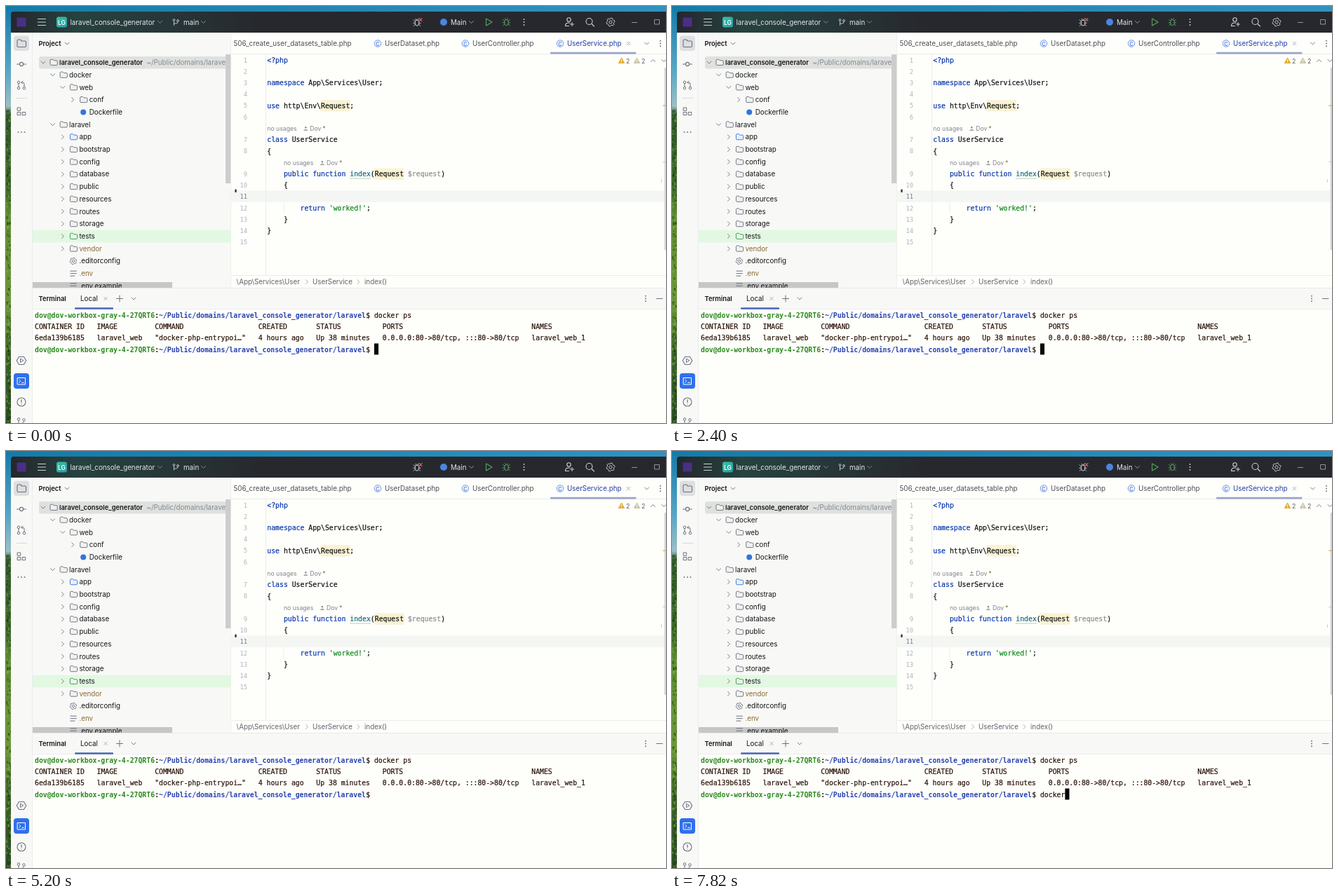
Recreate the animation shown at these times as an HTML page. Size 941 by 595 pixels, loop 8 s.

```html
<!DOCTYPE html>
<html lang="en">
<head>
<meta charset="utf-8">
<title>Editor and terminal</title>
<style>
html, body { margin: 0; width: 100%; height: 100%; overflow: hidden; background: #f8f9f6; }
svg { display: block; width: 941px; height: 595px; }
text { white-space: pre; }
.ui { font-family: Inter, "Open Sans", sans-serif; }
.mono { font-family: "DejaVu Sans Mono", "Noto Sans Mono", monospace; font-size: 9.803px; }
.firm { stroke: currentColor; stroke-width: .22px; }
</style>
</head>
<body>
<svg id="stage" viewBox="0 0 941 595" xmlns="http://www.w3.org/2000/svg"></svg>
<script>
const W = 941, H = 595, CW = 5.902;
const INK = '#141517', GRAY = '#6c707e', KEY = '#0a38ac', TERM = '#2b1509';
const PANEL = '#f8f9f6', PAPER = '#fefefb';
const out = [];
const add = s => out.push(s);
const esc = s => s.replace(/&/g, '&amp;').replace(/</g, '&lt;');

const rect = (x, y, w, h, fill, r = 0) =>
  add(`<rect x="${x}" y="${y}" width="${w}" height="${h}" rx="${r}" fill="${fill}"/>`);
const line = (d, color = GRAY, w = 1, fill = 'none') =>
  add(`<path d="${d}" fill="${fill}" stroke="${color}" stroke-width="${w}" stroke-linecap="round" stroke-linejoin="round"/>`);
const ring = (x, y, r, color = GRAY, w = 1, fill = 'none') =>
  add(`<circle cx="${x}" cy="${y}" r="${r}" fill="${fill}" stroke="${color}" stroke-width="${w}"/>`);
const dot = (x, y, r, color) => add(`<circle cx="${x}" cy="${y}" r="${r}" fill="${color}"/>`);
const ui = (x, y, s, color = INK, size = 9.8, weight = 400) =>
  add(`<text class="ui" x="${x}" y="${y + 3.5}" font-size="${size}" font-weight="${weight}" fill="${color}">${esc(s)}</text>`);
const mono = (x, y, s, color = INK, weight = 400) =>
  add(`<text class="mono${weight === 400 ? ' firm' : ''}" x="${x}" y="${y + 3.5}" font-weight="${weight}" color="${color}" fill="${color}">${esc(s)}</text>`);

const down = (x, y, color = GRAY) => line(`M${x - 3} ${y - 1.5}l3 3 3-3`, color, .9);
const right = (x, y, color = GRAY) => line(`M${x - 1.5} ${y - 3}l3 3-3 3`, color, .9);
const cross = (x, y) => line(`M${x - 2.3} ${y - 2.3}l4.6 4.6m0-4.6l-4.6 4.6`, '#9a9daa', .8);
const dots = (x, y, color, dx, dy) => {
  for (const k of [-1, 0, 1]) dot(x + k * dx, y + k * dy, .95, color);
};
const folder = (x, y, color = GRAY, fill = '#f1f2f0') =>
  line(`M${x + .5} ${y - 3}q0-1.2 1.2-1.2h2.6l1.6 1.5h3.6q1.2 0 1.2 1.2v4.2q0 1.2-1.2 1.2h-7.8q-1.2 0-1.2-1.2z`, color, .95, fill);
const gear = (x, y, r, color) => {
  ring(x, y, r * .36, color, .9);
  let d = '';
  for (let i = 0; i < 24; i++) {
    const a = (i + .5) * Math.PI / 12, q = i % 4 < 2 ? r : r * .8;
    d += (i ? 'L' : 'M') + (x + q * Math.sin(a)).toFixed(2) + ' ' + (y - q * Math.cos(a)).toFixed(2);
  }
  line(d + 'z', color, .95);
};
const bug = (x, y, color) => {
  line(`M${x - 2.7} ${y - 1}q0-2.5 2.7-2.5t2.7 2.5v2.5q0 3.2-2.7 3.2t-2.7-3.2z`, color, 1);
  line(`M${x - 5} ${y - 3.6}l2.3 2M${x + 5} ${y - 3.6}l-2.3 2M${x - 5.3} ${y + .8}h2.6m5.2 0h2.6M${x - 4.8} ${y + 4.7}l2.3-2M${x + 4.8} ${y + 4.7}l-2.3-2M${x - 1.8} ${y - 5.3}l.8 1.7m2.8-1.7l-.8 1.7`, color, .9);
};
const branch = (x, y, color) => {
  ring(x - 2.5, y - 3, 1.4, color, .9);
  ring(x + 3, y - 2, 1.4, color, .9);
  line(`M${x - 2.5} ${y - 1.6}v6M${x - 2.5} ${y + 2}h3q2.5 0 2.5-2.6`, color, .9);
};
const warning = (x, y, color) => {
  line(`M${x} ${y - 3.7}l4 7.2h-8z`, color, 1.2, color);
  line(`M${x} ${y - 1.3}v2.2m0 1.6v.1`, '#fff', .9);
};

function defs() {
  add(`<defs>
    <linearGradient id="sky"><stop stop-color="#157ba9"/><stop offset="1" stop-color="#2f93c2"/></linearGradient>
    <linearGradient id="land" x2="0" y2="1"><stop stop-color="#167dac"/><stop offset=".15" stop-color="#5ba8c5"/>
      <stop offset=".23" stop-color="#9cc0c4"/><stop offset=".25" stop-color="#2f5a2c"/><stop offset=".42" stop-color="#3d6a2a"/>
      <stop offset=".5" stop-color="#5f8d33"/><stop offset=".7" stop-color="#6b9638"/><stop offset=".82" stop-color="#3c6428"/>
      <stop offset="1" stop-color="#274922"/></linearGradient>
    <linearGradient id="bar"><stop stop-color="#25272c"/><stop offset=".1" stop-color="#26423f"/>
      <stop offset=".2" stop-color="#273a3b"/><stop offset=".38" stop-color="#27282e"/></linearGradient>
    <linearGradient id="badge" x2="1" y2="1"><stop stop-color="#38c4a4"/><stop offset="1" stop-color="#2799a8"/></linearGradient>
    <clipPath id="tree"><rect x="37" y="69" width="283.5" height="333"/></clipPath></defs>`);
}

function desktop() {
  rect(0, 0, W, 9, 'url(#sky)');
  rect(0, 6, 8, H, 'url(#land)');
  let seed = 7;
  const rnd = () => (seed = seed * 16807 % 2147483647) / 2147483647;
  for (let i = 0; i < 220; i++) {
    const shade = rnd() < .6 ? 'rgba(16,40,14,.45)' : 'rgba(150,190,80,.4)';
    rect((rnd() * 6).toFixed(1), (147 + rnd() * 446).toFixed(1), 2, (1.5 + rnd() * 3).toFixed(1), shade, 1);
  }
}

function titleBar() {
  const c = '#ced0d6';
  add('<path d="M7 38V12q0-4 4-4H941V38z" fill="url(#bar)"/>');
  rect(15.5, 16.5, 13, 13, '#4a2f86');
  line('M45.5 18.5h11m-11 4.5h11m-11 4.5h11', c, 1.1);
  rect(72, 15.5, 15, 15, 'url(#badge)', 3);
  ui(74, 23, 'LG', '#fff', 8.6, 600);
  ui(91.5, 23, 'laravel_console_generator', '#e3e5e9');
  down(219.5, 23, '#8d9099');
  branch(242, 23, c);
  ui(253, 23, 'main', '#e3e5e9');
  down(281.5, 23, '#8d9099');
  bug(586, 23.5, c);
  line('M589 17.5l4 4m0-4l-4 4', '#db5c5c', 1.1);
  dot(624, 23, 5, '#4a86e0');
  ui(634, 23, 'Main', '#e3e5e9');
  down(663.5, 23, '#a5a8b0');
  line('M684.5 18v10l8.5-5z', '#57a65c', 1.1);
  bug(713.5, 23, '#57a65c');
  dots(738.5, 23, c, 0, 4);
  ring(802.5, 19.5, 2.7, c, 1.1);
  line('M797.5 28.5q0-4.5 5-4.5h1.5m-6.5 4.5h5m4.5-5v5m-2.5-2.5h5', c, 1.1);
  ring(831.5, 22, 4.5, c, 1.1);
  line('M835 25.5l3.5 3.5', c, 1.1);
  gear(862, 23, 6, c);
  line('M892.5 23.5h7', '#9fa2a9', .9);
  line('M925 19.5h6.5v6.5h-6.5z', '#9fa2a9', .9);
}

function toolStrip() {
  rect(7, 38, 30, 557, PANEL);
  rect(11, 42.5, 22, 21.5, '#dddfe0', 4);
  line('M16 49.5q0-1.5 1.5-1.5h3l2 2h4.5q1.5 0 1.5 1.5v5.5q0 1.5-1.5 1.5h-9.5q-1.5 0-1.5-1.5z', GRAY, 1.1);
  ring(22, 83, 2.6, GRAY, 1.1);
  line('M15.5 83h3.9m5.2 0h3.9', GRAY, 1.1);
  ring(18, 108.8, 1.8);
  ring(18, 117.2, 1.8);
  ring(26, 117.2, 1.8);
  line('M18 110.6v4.8M26 115.4v-4.4q0-2-2-2h-2m1.8-2l-2 2 2 2');
  rect(15, 131, 15, 1, '#d5d7da');
  line('M16.5 145h4.2v4.2h-4.2zM16.5 151.5h4.2v4.2h-4.2zM23.5 151.5h4.2v4.2h-4.2z');
  dots(22, 180, GRAY, 4.5, 0);
  line('M18.5 500.5h7l3.3 5.5-3.3 5.5h-7l-3.3-5.5z', GRAY, 1.1);
  line('M20.5 503.5v5l4-2.5z');
  rect(11, 524, 22, 22, '#3070ea', 4);
  line('M16.5 530.5h11v9.5h-11zM18.8 533.2l2 2-2 2m4 .2h2.6', '#fff', 1);
  ring(22, 565, 6, GRAY, 1.1);
  line('M22 561.8v3.8m0 2.4v.1', GRAY, 1.2);
  ring(18, 589.5, 1.8);
  ring(25.5, 590.5, 1.8);
  line('M18 591.5v4m7.5-3q0 3-4 3');
}

// depth, name, kind, expanded, text colour, icon colour
const ROWS = [
  [1, 'docker', 'dir', 1], [2, 'web', 'dir', 1], [3, 'conf', 'dir', 0], [3, 'Dockerfile', 'box'],
  [1, 'laravel', 'dir', 1], [2, 'app', 'dir', 0, , '#3d76dc'], [2, 'bootstrap', 'dir', 0],
  [2, 'config', 'dir', 0], [2, 'database', 'dir', 0], [2, 'public', 'dir', 0], [2, 'resources', 'dir', 0],
  [2, 'routes', 'dir', 0], [2, 'storage', 'dir', 0], [2, 'tests', 'dir', 0, , '#3f9a50'],
  [2, 'vendor', 'dir', 0, '#8a6a35'], [2, '.editorconfig', 'gear'],
  [2, '.env', 'file', , '#8a6a35'], [2, '.env.example', 'file']
];

function projectTree() {
  rect(37, 38, 284, 364, PANEL);
  ui(46.5, 53.5, 'Project', INK, 9.4, 600);
  down(87, 53.5);
  add('<g clip-path="url(#tree)">');
  rect(47, 72, 280, 17.5, '#dfe1df', 3);
  rect(37, 319.7, 284, 17.7, '#e2f8e2');
  rect(37, 394, 200, 8, '#c6c7c6');
  down(53, 80.5);
  folder(62.5, 80.5);
  ui(76, 80.5, 'laravel_console_generator', INK, 9.4, 600);
  ui(200.5, 80.5, '~/Public/domains/laravel_console', '#858893');
  ROWS.forEach(([depth, name, kind, open, ink = INK, tint = GRAY], i) => {
    const y = 98.3 + i * 17.71, x = 62.3 + depth * 14.3;
    if (kind === 'dir') {
      (open ? down : right)(x - 10, y);
      folder(x, y, tint, tint === GRAY ? '#f1f2f0' : tint === '#3d76dc' ? '#e9f0fd' : '#eaf7ec');
    } else if (kind === 'box') dot(x + 5, y, 4, '#3574d8');
    else if (kind === 'gear') gear(x + 5, y, 4.8, GRAY);
    else line(`M${x + 1} ${y - 3.5}h8.5m-8.5 3.5h8.5m-8.5 3.5h6`);
    ui(x + 13.5, y, name, ink);
  });
  add('</g>');
  rect(313, 69, 7.5, 184, '#cccdcc');
  rect(320.5, 38, 1, 364, '#e8eaea');
}

function tabs() {
  rect(321, 38, 620, 31, PAPER);
  ui(324.5, 53.5, '506_create_user_datasets_table.php', '#4b4e57');
  [[530, 'UserDataset.php'], [655, 'UserController.php'], [790, 'UserService.php']].forEach(([x, name], i) => {
    ring(x, 53.5, 4.8, '#6c93dd', .95, '#edf3ff');
    ui(x - 2.7, 53.4, 'C', '#3d70d4', 7.2, 500);
    ui(x + 10, 53.5, name, i === 2 ? '#243fa6' : '#4b4e57');
  });
  cross(887.5, 53.5);
  down(913.5, 53.5);
  dots(933, 53.5, GRAY, 0, 3.7);
  rect(321, 68, 620, 1, '#ebecee');
  rect(776, 65.8, 122.5, 2.8, '#99a5cb', 1);
}

const rowY = i => 77.2 + i * 16.24;
const codeX = n => 372.3 + n * CW;

function hint(x, y) {
  ui(x, y, 'no usages', '#80838e', 8.7);
  dot(x + 55, y - 1.8, 1.2, '#80838e');
  line(`M${x + 52.7} ${y + 2.3}q2.3-3.2 4.6 0z`, '#80838e', .8);
  ui(x + 61, y, 'Dov', '#80838e', 8.7);
  ui(x + 79, y, '*', '#8a6a35', 8.7);
}

// row, column, text, colour
const CODE = [
  [0, 0, '<?php', KEY], [2, 0, 'namespace', KEY], [2, 10, 'App\\Services\\User;'],
  [4, 0, 'use', KEY], [4, 4, 'http\\Env\\Request;'], [7, 0, 'class', KEY], [7, 6, 'UserService'],
  [8, 0, '{'], [10, 4, 'public function', KEY], [10, 20, 'index', '#1d6b80'], [10, 25, '(Request'],
  [10, 34, '$request', '#8c8c8c'], [10, 42, ')'], [11, 4, '{'], [13, 8, 'return', KEY],
  [13, 15, "'worked!'", '#118a20'], [13, 24, ';'], [14, 4, '}'], [15, 0, '}']
];

function editor() {
  rect(321, 69, 620, 315, PAPER);
  rect(321.5, 263.5, 620, 16.3, '#f4f6f4');
  rect(370, 69, 1, 315, '#ebecec');
  rect(395.5, 280, 1, 16, '#ebecec');
  rect(codeX(13) - .5, 134, 42.5, 16.2, '#faf3d3');
  rect(codeX(26) - .5, 231.5, 42.5, 16.2, '#faf3d3');
  let n = 0;
  for (let i = 0; i < 17; i++) {
    if (i === 6 || i === 9) continue;
    const s = ++n;
    add(`<text class="mono" x="344" y="${rowY(i) + 3.3}" text-anchor="end" style="font-size:8.8px" fill="${s === 11 ? '#767a8a' : '#aeb3c2'}">${s}</text>`);
  }
  hint(372.3, rowY(6) + .3);
  hint(395.9, rowY(9) + .6);
  for (const [row, col, s, color] of CODE) mono(codeX(col), rowY(row), s, color);
  line(`M${codeX(20)} 246h29.5`, '#9cc3a5', .8);
  rect(326.3, 261.5, 2.4, 4.5, '#33353a', 1);
  warning(877.5, 78, '#e2ae3a');
  ui(884, 78, '2', '#5a5d6b', 8.8);
  warning(899.5, 78, '#cbc8a4');
  ui(906, 78, '2', '#5a5d6b', 8.8);
  line('M919.5 79.5l3-3 3 3', GRAY, .9);
  down(938, 78);
  rect(938.7, 88, 2.3, 260, '#d3d4d4');
  rect(936.5, 141.3, 4.5, 1.6, '#e5bd4a');
  rect(936.5, 222, 4.5, 1, '#c3c5c9');
  rect(934, 247.5, 1, 4, '#c5c8d0');
  rect(321, 384, 620, 18, PAPER);
  rect(321, 384, 620, 1, '#ebecee');
  ui(328.5, 393.3, '\\App\\Services\\User', '#62656f');
  right(429, 393.5, '#a5a8b3');
  ui(437, 393.3, 'UserService', '#62656f');
  right(502.5, 393.5, '#a5a8b3');
  ui(511, 393.3, 'index()', '#62656f');
}

const TX = 41, termX = n => TX + n * CW;
const HOST = 'dov@dov-workbox-gray-4-27QRT6';
const PATH = '~/Public/domains/laravel_console_generator/laravel';

function prompt(y) {
  mono(TX, y, HOST, '#2a8a1c', 700);
  mono(termX(29), y, ':', TERM, 700);
  mono(termX(30), y, PATH, '#2742b0', 700);
  mono(termX(80), y, '$', TERM);
}

function terminal() {
  rect(37, 402, 904, 30.5, PANEL);
  rect(37, 402, 904, 1, '#e8eaea');
  rect(37, 432.5, 904, 163, PAPER);
  rect(37, 432, 904, 1, '#ebecee');
  rect(37, 38, 1, 557, '#ebecee');
  ui(46.5, 417.5, 'Terminal', INK, 9.4, 600);
  ui(106, 417.5, 'Local');
  cross(142, 417.5);
  line('M157.5 417.5h9m-4.5-4.5v9');
  down(182, 417.5);
  rect(98, 430.2, 55, 2.5, '#4566b8', 1);
  dots(912, 417.5, GRAY, 0, 3.7);
  line('M927.5 417.5h8.5');
  prompt(441.2);
  mono(termX(82), 441.2, 'docker ps', TERM);
  const cols = [0, 15, 29, 54, 68, 84, 120];
  const table = [
    ['CONTAINER ID', 'IMAGE', 'COMMAND', 'CREATED', 'STATUS', 'PORTS', 'NAMES'],
    ['6eda139b6185', 'laravel_web', '"docker-php-entrypoi…"', '4 hours ago', 'Up 38 minutes', '0.0.0.0:80->80/tcp, :::80->80/tcp', 'laravel_web_1']
  ];
  table.forEach((cells, r) => cells.forEach((s, c) => mono(termX(cols[c]), 457.5 + r * 16.3, s, TERM)));
  prompt(490);
  add(`<text id="typed" class="mono firm" x="${termX(82)}" y="493.5" color="${TERM}" fill="${TERM}"></text>`);
  add('<rect id="caret" y="481.5" width="6.1" height="16" fill="#050505"/>');
}

[defs, desktop, titleBar, toolStrip, projectTree, tabs, editor, terminal].forEach(f => f());
document.getElementById('stage').innerHTML = out.join('');

// time in ms, letters typed, caret visible
const STEPS = [
  [0, 0, 1], [560, 0, 0], [1260, 0, 1], [1840, 0, 0], [2400, 0, 1], [2780, 0, 0], [3200, 0, 1],
  [4220, 0, 0], [5340, 0, 1], [5480, 1, 1], [6000, 2, 1], [6860, 3, 1], [7160, 4, 1], [7400, 5, 1], [7820, 6, 1]
];
const LOOP = 8000;
const typed = document.getElementById('typed'), caret = document.getElementById('caret');
const start = performance.now();

function draw() {
  const t = Math.max(0, performance.now() - start) % LOOP;
  const [, n, on] = STEPS.filter(s => s[0] <= t).pop();
  typed.textContent = 'docker'.slice(0, n);
  caret.setAttribute('x', termX(82 + n));
  caret.setAttribute('visibility', on ? 'visible' : 'hidden');
  requestAnimationFrame(draw);
}
draw();
</script>
</body>
</html>
```
